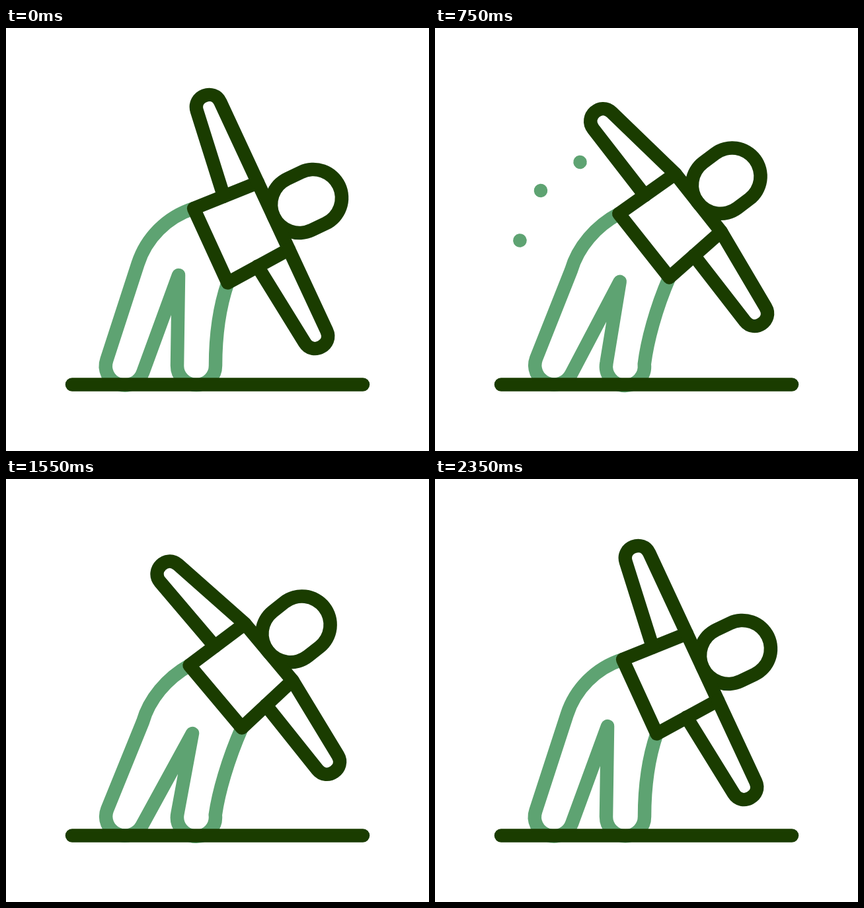
Animation, 640 px wide and 640 px high, one loop 2.4 s. Source, as an HTML page:

```html
<!DOCTYPE html>
<html lang="en">
<head>
<meta charset="utf-8">
<title>Side bend stretch</title>
<style>
  html, body { margin: 0; width: 100%; height: 100%; overflow: hidden; background: #fff; }
  svg { display: block; width: 100%; height: 100%; }
  path {
    fill: none;
    stroke: #1a3c00;
    stroke-width: 20.5;
    stroke-linecap: round;
    stroke-linejoin: round;
  }
  .green path { stroke: #5ea372; }

  /* The whole figure swings between two poses. */
  .pose path { animation: 1200ms cubic-bezier(.667, 0, .333, 1) infinite alternate; }
  .pose .legs { animation-name: legs; }
  .pose .head { animation-name: head; }
  .pose .torso { animation-name: torso; }
  .pose .raised { animation-name: raised; }
  .pose .lowered { animation-name: lowered; }
  .head { stroke-width: 106.5; }
  .head.inner { stroke: #fff; stroke-width: 65.5; }

  @keyframes legs {
    from { d: path("M284 273C243 286 212 318 199.5 357L152.4 502A29 29 0 0 0 207.2 521L261 374L259 511A29 29 0 1 0 317 511C317 470 322 425 335.5 385.5"); }
    to { d: path("M276.8 283C243 303.2 217 335.2 207.6 369.2L153.2 499.9A29 29 0 0 0 205.2 525.3L284.3 386.2L259.6 505.4A29 29 0 1 0 316.7 508C322 475 337 425 359.3 375.4"); }
  }
  @keyframes head {
    from { d: path("M444 267L465 257"); }
    to { d: path("M428.8 230.5L445.7 216.4"); }
  }
  @keyframes torso {
    from { d: path("M284 273L381 234L428 335L335.5 385.5Z"); }
    to { d: path("M276.8 283L359.2 217.3L434.1 301.5L359.3 375.4Z"); }
  }
  @keyframes raised {
    from { d: path("M329.5 254.6L288.9 125.7C281.8 103.2 314.4 90.6 324.3 112L381 234"); }
    to { d: path("M314.5 253.1L227.1 159.4C211 142.1 234.6 116.7 253 131.5L359.2 217.3"); }
  }
  @keyframes lowered {
    from { d: path("M380.5 360.5L451.9 476C464.3 496.1 495.2 479.4 485.2 458L428 335"); }
    to { d: path("M394.7 340.2L473.1 435.4C488.1 453.6 516.4 433.3 503.9 413.3L434.1 301.5"); }
  }

  /* Short strokes shoot outwards from the hip. */
  .sparks path {
    stroke-dasharray: 1 3;
    animation: trim 2400ms linear infinite, show 2400ms step-end infinite;
  }
  @keyframes trim {
    0%, 31.25% { stroke-dashoffset: 1; }
    39.583% { stroke-dashoffset: 0; }
    47.917%, 100% { stroke-dashoffset: -1; }
  }
  @keyframes show {
    0% { opacity: 0; }
    31.25% { opacity: 1; }
    47.917%, 100% { opacity: 0; }
  }
</style>
</head>
<body>
<svg viewBox="0 0 640 640">
  <g class="green sparks">
    <path pathLength="1" d="M219.5 203L217.5 190"/>
    <path pathLength="1" d="M160 246L149 237"/>
    <path pathLength="1" d="M128.5 321.5L114 323.5"/>
  </g>
  <g class="green pose"><path class="legs"/></g>
  <path d="M100 539.5H540"/>
  <g class="pose">
    <path class="head"/>
    <path class="head inner"/>
    <path class="torso"/>
    <path class="raised"/>
    <path class="lowered"/>
  </g>
</svg>
</body>
</html>
```
